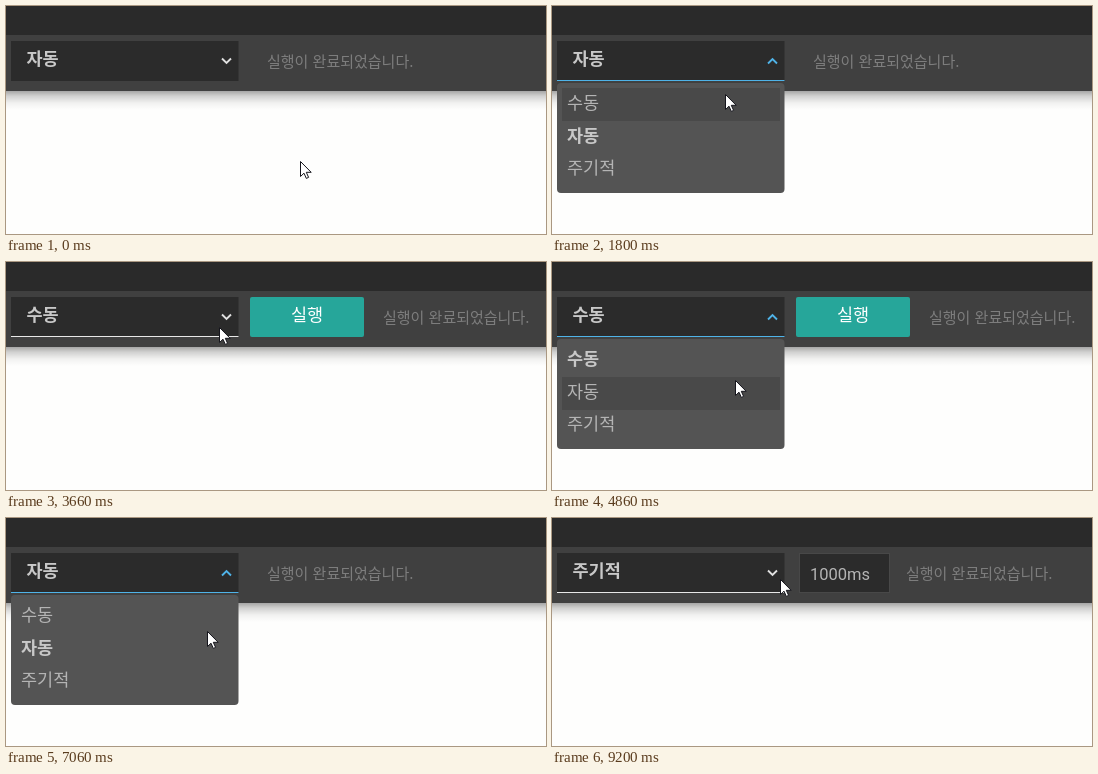
Animation, 540 px wide and 228 px high, one loop 9260 ms. Source, as an HTML page:

```html
<!DOCTYPE html>
<html lang="ko">
<head>
<meta charset="utf-8">
<style>
html, body { margin: 0; width: 100%; height: 100%; overflow: hidden; background: #fefefd; }
svg { display: block; width: 540px; height: 228px; }
text { font: 17.5px "Noto Sans CJK KR", "Noto Sans CJK JP", sans-serif; fill: #b4b4b4; }
#value, .on { font-weight: 700; fill: #c8c8c8; }
#run text { fill: #fff; }
#period text { font: 16.5px Roboto, sans-serif; }
#status { font-size: 15px; fill: #7d7d7d; }
</style>
</head>
<body>
<svg viewBox="0 0 540 228">
  <defs>
    <linearGradient id="fade" x2="0" y2="1">
      <stop stop-opacity=".38"/>
      <stop offset=".3" stop-opacity=".18"/>
      <stop offset=".65" stop-opacity=".05"/>
      <stop offset="1" stop-opacity="0"/>
    </linearGradient>
    <clipPath id="below"><rect y="75" width="540" height="153"/></clipPath>
  </defs>
  <rect y="84" width="540" height="20" fill="url(#fade)"/>
  <rect width="540" height="85" fill="#404040"/>
  <rect width="540" height="29" fill="#2a2a2a"/>
  <text id="status" y="61"></text>
  <g id="run">
    <rect x="244" y="35" width="114" height="40" rx="2"/>
    <text x="301" y="59" text-anchor="middle">실행</text>
  </g>
  <g id="period">
    <rect x="247.5" y="35.5" width="90" height="39" fill="#2b2b2b" stroke="#484848"/>
    <text x="258" y="62">1000ms</text>
  </g>
  <g clip-path="url(#below)">
    <g id="menu">
      <rect x="5" y="77" width="227.5" height="110" rx="4" fill="#545454"/>
      <rect id="hover" x="10" width="218" height="33" fill="#494949"/>
    </g>
  </g>
  <rect x="5" y="35" width="227.5" height="40" fill="#2b2b2b"/>
  <text id="value" x="20.5" y="59"></text>
  <rect id="line" x="5" y="74" width="227.5" height="1"/>
  <path id="arrow" fill="none" stroke-width="1.9"/>
  <path id="cursor" d="M.5 .5V15.5L4 12.2 6.3 17.4 8.6 16.4 6.3 11.3H11.2Z" fill="#fff" stroke="#15151c"/>
</svg>
<script>
const $ = id => document.getElementById(id);
const LOOP = 9260, FPS = 15;
const modes = ['수동', '자동', '주기적'];
const statusX = [377, 261, 354];

// Times below are ticks of 1/15 s.
const path = [ // tick, x, y
  [3, 294, 155], [14, 219, 47],
  [23, 219, 47], [29, 157, 102],
  [36, 157, 102], [47, 300, 53],
  [50, 300, 53], [53, 258, 71], [55, 213, 65], [58, 214, 61],
  [69, 214, 61], [73, 183, 118],
  [89, 183, 118], [99, 217, 56],
  [103, 217, 56], [106, 201, 113], [112, 198, 160],
  [125, 198, 160], [134, 237, 66], [138, 228, 61]
];
const picks = [ // menu opens, choice made, mode
  [18, 30, 0], [61, 78, 1], [102, 114, 2]
];
const slide = [-88, -32, 0];

function pointer(k) {
  const i = path.findIndex(p => p[0] > k);
  if (i === 0) return path[0].slice(1);
  if (i < 0) return path.at(-1).slice(1);
  const [a, ax, ay] = path[i - 1], [b, bx, by] = path[i];
  const u = (k - a) / (b - a), e = u * u * (3 - 2 * u);
  return [Math.round(ax + (bx - ax) * e), Math.round(ay + (by - ay) * e)];
}

const show = (id, on) => $(id).setAttribute('visibility', on ? 'visible' : 'hidden');
const set = (id, name, value) => $(id).setAttribute(name, value);
const inside = (x, y, l, t, r, b) => x >= l && x < r && y >= t && y < b;

const items = modes.map((name, i) => {
  const item = document.createElementNS('http://www.w3.org/2000/svg', 'text');
  item.textContent = name;
  item.setAttribute('x', 15);
  item.setAttribute('y', 103 + 32.7 * i);
  $('menu').append(item);
  return item;
});

function draw(k) {
  const [x, y] = pointer(k);
  const open = picks.find(([from, to]) => k >= from && k < to);
  const mode = picks.reduce((m, [, to, next]) => k >= to ? next : m, 1);

  $('value').textContent = modes[mode];
  $('status').textContent = '실행이 완료되었습니다.';
  set('status', 'x', statusX[mode]);
  show('run', mode === 0);
  show('period', mode === 2);
  $('run').firstElementChild.setAttribute('fill',
    inside(x, y, 244, 35, 358, 75) ? '#2bbbad' : '#26a69a');

  show('menu', open);
  if (open) set('menu', 'transform', `translate(0 ${slide[Math.min(k - open[0], 2)]})`);
  items.forEach((item, i) => item.classList.toggle('on', i === mode));
  const row = Math.floor((y - 82) / 33);
  show('hover', open && row >= 0 && row < 3 && (y - 82) % 33 < 31);
  set('hover', 'y', 82 + 33 * row);

  show('line', open || inside(x, y, 5, 35, 232, 75));
  set('line', 'fill', open ? '#4fb3e8' : '#e8e8e8');
  set('arrow', 'd', open ? 'M216 57.5L220.5 53 225 57.5' : 'M216 52.5L220.5 57 225 52.5');
  set('arrow', 'stroke', open ? '#4fb3e8' : '#e0e0e0');
  set('cursor', 'transform', `translate(${x} ${y})`);
}

const start = performance.now();
function frame() {
  const t = (performance.now() - start) % LOOP;
  draw(Math.floor((t + 7) * FPS / 1000));
  requestAnimationFrame(frame);
}
frame();
</script>
</body>
</html>
```
